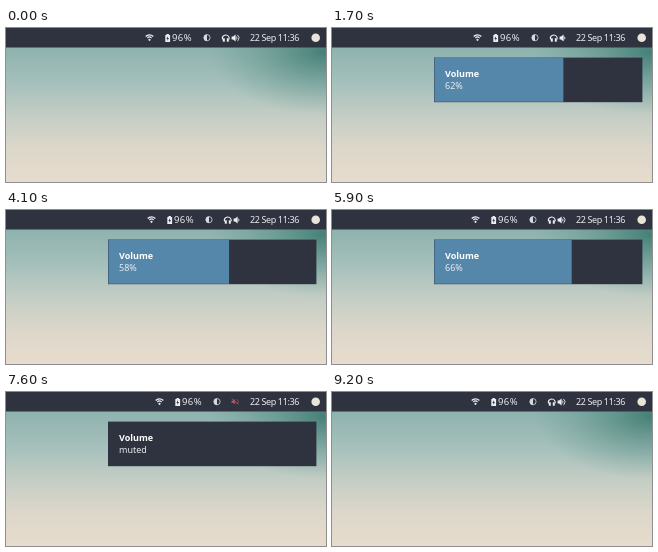
Animation, 320 px wide and 154 px high, one loop 9300 ms. Source, as an HTML page with a canvas:

```html
<!DOCTYPE html>
<html lang="en">
<head>
<meta charset="utf-8">
<title>Volume notification</title>
<style>
  html, body { margin: 0; width: 100%; height: 100%; overflow: hidden; background: #2f3340; }
  canvas { display: block; }
</style>
</head>
<body>
<canvas id="stage" width="320" height="154"></canvas>
<script>
const ctx = document.getElementById('stage').getContext('2d');
const LOOP = 9300;
const LIFETIME = 500;
const DARK = '#2f3340';
const LIGHT = '#eceef1';
const BLUE = '#5587ab';
const FONT = '"Noto Sans", sans-serif';

// Each key press changes the volume and shows the popup for LIFETIME ms.
const presses = [
  [500, 64], [1500, 62], [1900, 60], [2300, 58], [2600, 56],
  [4100, 58], [4500, 60], [4800, 62], [5100, 64], [5500, 66],
  [7200, 'muted'], [8200, 66]
];

function stateAt(time) {
  let level = 66, popup = false;
  for (const [start, value] of presses) {
    if (time < start) break;
    level = value;
    popup = time < start + LIFETIME;
  }
  return { level, popup };
}

function text(str, x, y, { size = 9, weight = 400, spacing = 0, color = LIGHT } = {}) {
  ctx.font = `${weight} ${size}px ${FONT}`;
  ctx.letterSpacing = `${spacing}px`;
  ctx.fillStyle = color;
  ctx.fillText(str, x, y);
}

function arc(x, y, r, from = 0, to = 2 * Math.PI) {
  ctx.beginPath();
  ctx.arc(x, y, r, from, to);
}

function polygon(points) {
  ctx.beginPath();
  points.forEach(([x, y]) => ctx.lineTo(x, y));
  ctx.closePath();
  ctx.fill();
}

function strokeArc(x, y, r, from, to, width = 1) {
  ctx.lineWidth = width;
  arc(x, y, r, from, to);
  ctx.stroke();
}

function wallpaper() {
  const sky = ctx.createLinearGradient(0, 19, 0, 154);
  sky.addColorStop(0, '#8db2ae');
  sky.addColorStop(0.28, '#a7c1bc');
  sky.addColorStop(0.52, '#c5cec5');
  sky.addColorStop(0.75, '#dcd7ca');
  sky.addColorStop(1, '#e7dccd');
  ctx.fillStyle = sky;
  ctx.fillRect(0, 19, 320, 135);

  ctx.save();
  ctx.translate(318, 24);
  ctx.scale(1, 0.55);
  const shade = ctx.createRadialGradient(0, 0, 0, 0, 0, 115);
  shade.addColorStop(0, 'rgba(62,122,112,.9)');
  shade.addColorStop(0.4, 'rgba(78,136,126,.55)');
  shade.addColorStop(1, 'rgba(100,152,142,0)');
  ctx.fillStyle = shade;
  ctx.fillRect(-130, -9, 132, 140);
  ctx.restore();
}

function wifi(x) {
  ctx.strokeStyle = ctx.fillStyle = LIGHT;
  const mid = -Math.PI / 2;
  for (const r of [2.9, 5.2]) strokeArc(x, 12, r, mid - 0.82, mid + 0.82, 1.3);
  arc(x, 11.8, 1.1);
  ctx.fill();
}

function battery(x) {
  ctx.fillStyle = LIGHT;
  ctx.fillRect(x + 1.2, 6, 2.4, 1);
  ctx.fillRect(x, 7, 4.8, 7);
  ctx.fillStyle = DARK;
  polygon([[x + 2.8, 8], [x + 1.1, 10.9], [x + 2.2, 10.9], [x + 2, 13], [x + 3.7, 10], [x + 2.6, 10]]);
}

function contrast(x) {
  ctx.strokeStyle = ctx.fillStyle = '#d5d8dd';
  strokeArc(x, 9.7, 3.1, 0, 2 * Math.PI, 0.8);
  arc(x, 9.7, 3.2, Math.PI / 2, Math.PI * 1.5);
  ctx.fill();
}

function headphones(x) {
  ctx.strokeStyle = ctx.fillStyle = LIGHT;
  strokeArc(x + 4, 10.4, 3.4, Math.PI * 0.9, Math.PI * 2.1, 1.1);
  ctx.fillRect(x + 1, 10.3, 2, 3.4);
  ctx.fillRect(x + 5, 10.3, 2, 3.4);
}

function speaker(x, loud) {
  ctx.strokeStyle = ctx.fillStyle = LIGHT;
  polygon([[x, 8.6], [x + 1.5, 8.6], [x + 4, 6.6], [x + 4, 13.4], [x + 1.5, 11.4], [x, 11.4]]);
  strokeArc(x + 3.3, 10, 2, -0.8, 0.8, 0.9);
  if (loud) strokeArc(x + 3.3, 10, 4, -0.9, 0.9, 0.9);
}

function mutedSpeaker(x) {
  ctx.fillStyle = ctx.strokeStyle = '#b5586c';
  polygon([[x, 8.7], [x + 1.3, 8.7], [x + 3.3, 7], [x + 3.3, 12.2], [x + 1.3, 10.8], [x, 10.8]]);
  ctx.lineWidth = 0.8;
  ctx.beginPath();
  ctx.moveTo(x + 0.2, 6.5);
  ctx.lineTo(x + 7.2, 12.4);
  ctx.stroke();
  strokeArc(x + 3, 9.7, 3.6, -0.8, 0.8, 0.7);
}

function bar(level) {
  const muted = level === 'muted';
  const loud = level >= 66;
  const shift = muted ? 10 : loud ? 0 : 2;
  ctx.fillStyle = DARK;
  ctx.fillRect(0, 0, 320, 19.5);

  wifi(143.5 + shift);
  battery(159.3 + shift);
  text('96%', 166 + shift, 13, { size: 9.5, spacing: 0.4 });
  contrast(201 + shift);
  if (muted) {
    mutedSpeaker(225.5);
  } else {
    headphones(215.8 + shift);
    speaker(225.6 + shift, loud);
  }
  text('22 Sep 11:36', 244, 13, { spacing: -0.38 });

  ctx.fillStyle = '#e9e3d9';
  arc(309.7, 9.7, 4.3);
  ctx.fill();
}

function notification(level) {
  const muted = level === 'muted';
  ctx.fillStyle = DARK;
  ctx.fillRect(102, 29.6, 208.4, 44.6);
  if (!muted) {
    ctx.fillStyle = BLUE;
    ctx.fillRect(102.4, 30, 208 * level / 100, 43.8);
  }
  text('Volume', 113, 49, { weight: 700, color: '#fff' });
  text(muted ? 'muted' : `${level}%`, 113, 61);
}

function frame() {
  const { level, popup } = stateAt(performance.now() % LOOP);
  wallpaper();
  bar(level);
  if (popup) notification(level);
  requestAnimationFrame(frame);
}
frame();
</script>
</body>
</html>
```
